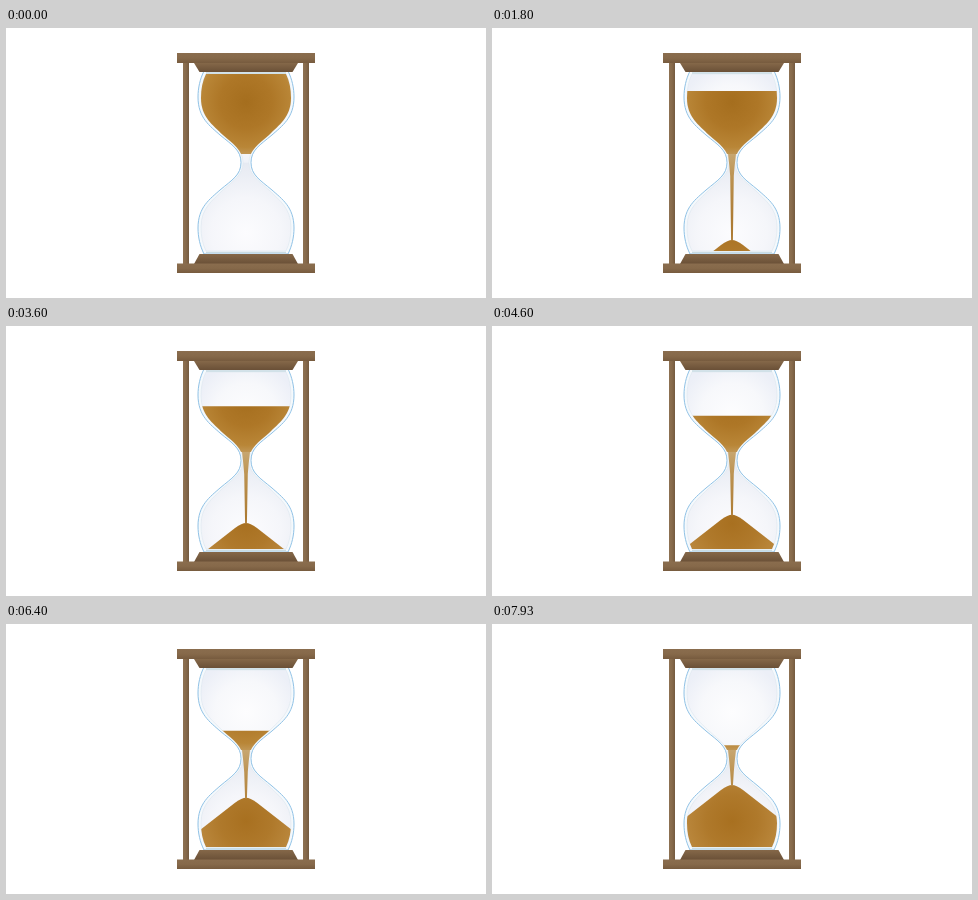
Write an HTML page that moves like this. It is 480 px wide and 270 px high and loops after 8 s.

```html
<!DOCTYPE html>
<html lang="en">
<head>
<meta charset="utf-8">
<title>Hourglass</title>
<style>
  html, body { margin: 0; width: 100%; height: 100%; overflow: hidden; background: #fff; }
  svg { display: block; width: 100vw; height: 100vh; }
</style>
</head>
<body>
<svg viewBox="0 0 480 270">
  <defs>
    <linearGradient id="plate" x2="0" y2="1">
      <stop stop-color="#8a6d4e"/><stop offset=".5" stop-color="#86694a"/><stop offset="1" stop-color="#775b3e"/>
    </linearGradient>
    <linearGradient id="cap" x2="0" y2="1">
      <stop stop-color="#856849"/><stop offset="1" stop-color="#6a5037"/>
    </linearGradient>
    <linearGradient id="pillar">
      <stop stop-color="#8d7152"/><stop offset=".5" stop-color="#876a4b"/><stop offset="1" stop-color="#745a3f"/>
    </linearGradient>
    <radialGradient id="upperAir" gradientUnits="userSpaceOnUse" cx="240" cy="88" r="52">
      <stop stop-color="#fdfdfe"/><stop offset=".6" stop-color="#f7f8fb"/><stop offset="1" stop-color="#eceff7"/>
    </radialGradient>
    <radialGradient id="lowerAir" gradientUnits="userSpaceOnUse" cx="240" cy="205" r="70">
      <stop stop-color="#fcfcfe"/><stop offset=".5" stop-color="#f5f6fa"/><stop offset="1" stop-color="#e6eaf2"/>
    </radialGradient>
    <radialGradient id="upperSand" gradientUnits="userSpaceOnUse" cx="240" cy="74" r="58">
      <stop stop-color="#a56e1e"/><stop offset=".45" stop-color="#ae7727"/>
      <stop offset=".78" stop-color="#b98637"/><stop offset="1" stop-color="#c7a56e"/>
    </radialGradient>
    <radialGradient id="lowerSand" gradientUnits="userSpaceOnUse" cx="240" cy="197" r="52">
      <stop stop-color="#a87020"/><stop offset=".5" stop-color="#af792b"/><stop offset="1" stop-color="#bc8a40"/>
    </radialGradient>
    <linearGradient id="streamSand" gradientUnits="userSpaceOnUse" x1="0" y1="126" x2="0" y2="190">
      <stop stop-color="#c7a670"/><stop offset=".4" stop-color="#bb914f"/><stop offset="1" stop-color="#ad7c35"/>
    </linearGradient>
    <clipPath id="inside"><path class="inner"/></clipPath>
    <clipPath id="level"><rect id="levelBox" x="180" width="120"/></clipPath>
  </defs>

  <path id="outer" fill="#f5f9fc" stroke="#90c2e6"/>
  <g clip-path="url(#inside)">
    <rect x="190" y="40" width="100" height="94.5" fill="url(#upperAir)"/>
    <rect x="190" y="134.5" width="100" height="95" fill="url(#lowerAir)"/>
  </g>
  <path class="inner" fill="none" stroke="#dce6ee" stroke-width=".6"/>
  <path d="M200 45H280M200 224.5H280" stroke="#c9dce3" stroke-width="1.6"/>

  <g clip-path="url(#inside)">
    <rect x="190" y="40" width="100" height="86" fill="url(#upperSand)" clip-path="url(#level)"/>
    <path id="pile" fill="url(#lowerSand)"/>
  </g>
  <path id="stream" fill="url(#streamSand)"/>

  <g fill="url(#pillar)">
    <rect x="177" y="34" width="6" height="203"/>
    <rect x="297" y="34" width="6" height="203"/>
  </g>
  <path d="M188 35H292L286.500 44H193.500Z" fill="url(#cap)"/>
  <path d="M193.500 226H286.500L292 236H188Z" fill="url(#cap)"/>
  <rect x="171" y="25" width="138" height="10" fill="url(#plate)"/>
  <rect x="171" y="235.500" width="138" height="9.500" fill="url(#plate)"/>
</svg>
<script>
const LOOP = 8000, STEPS_PER_MS = 0.015;
const CX = 240, CY = 134.5, NECK = 126;
const byId = id => document.getElementById(id);

// Mirror one Bezier quarter (top left to neck) into a whole glass outline.
function glassPath(quarter) {
  const reflect = (points, map) => points.concat(points.slice(0, -1).reverse().map(map));
  const left = reflect(quarter, ([x, y]) => [x, 2 * CY - y]);
  const right = left.slice().reverse().map(([x, y]) => [2 * CX - x, y]);
  return `M${left[0]}C${left.slice(1).join(' ')}L${right[0]}C${right.slice(1).join(' ')}Z`;
}

byId('outer').setAttribute('d', glassPath([
  [198, 43], [194, 51], [192, 60], [192, 69], [192, 90], [204, 98],
  [214, 107], [226, 117], [235, 122], [235, CY]]));

const innerPath = glassPath([
  [200, 46], [196.5, 53], [195, 61], [195, 70], [195, 89], [207, 97],
  [217, 107], [227, 116], [237, 122], [237, CY]]);
document.querySelectorAll('.inner').forEach(p => p.setAttribute('d', innerPath));

function pilePath(peak) {
  const shoulder = peak + 5, foot = shoulder + 50 * 0.78;
  return `M${CX - 61} ${foot}L${CX - 11} ${shoulder}Q${CX - 4} ${peak} ${CX} ${peak}` +
    `Q${CX + 4} ${peak} ${CX + 11} ${shoulder}L${CX + 61} ${foot}V270H${CX - 61}Z`;
}

function streamPath(end) {
  if (end <= NECK) return '';
  const bend = Math.min(NECK + 22, end), mid = (NECK + bend) / 2;
  return `M${CX - 4} ${NECK}Q${CX - 2.6} ${mid} ${CX - 1.8} ${bend}L${CX - 0.9} ${end}` +
    `H${CX + 0.9}L${CX + 1.8} ${bend}Q${CX + 2.6} ${mid} ${CX + 4} ${NECK}Z`;
}

function draw(now) {
  const t = Math.floor((now % LOOP + 4) * STEPS_PER_MS) / STEPS_PER_MS % LOOP;
  const level = 46 + 0.0095 * t, peak = 227 - 0.00832 * t;
  byId('levelBox').setAttribute('y', level);
  byId('levelBox').setAttribute('height', Math.max(0, NECK - level));
  byId('pile').setAttribute('d', pilePath(peak));
  byId('stream').setAttribute('d', streamPath(Math.min(NECK + 0.25 * t, peak + 1, 224)));
}

const start = performance.now();
function tick() {
  draw(performance.now() - start);
  requestAnimationFrame(tick);
}
draw(0);
requestAnimationFrame(tick);
</script>
</body>
</html>
```
